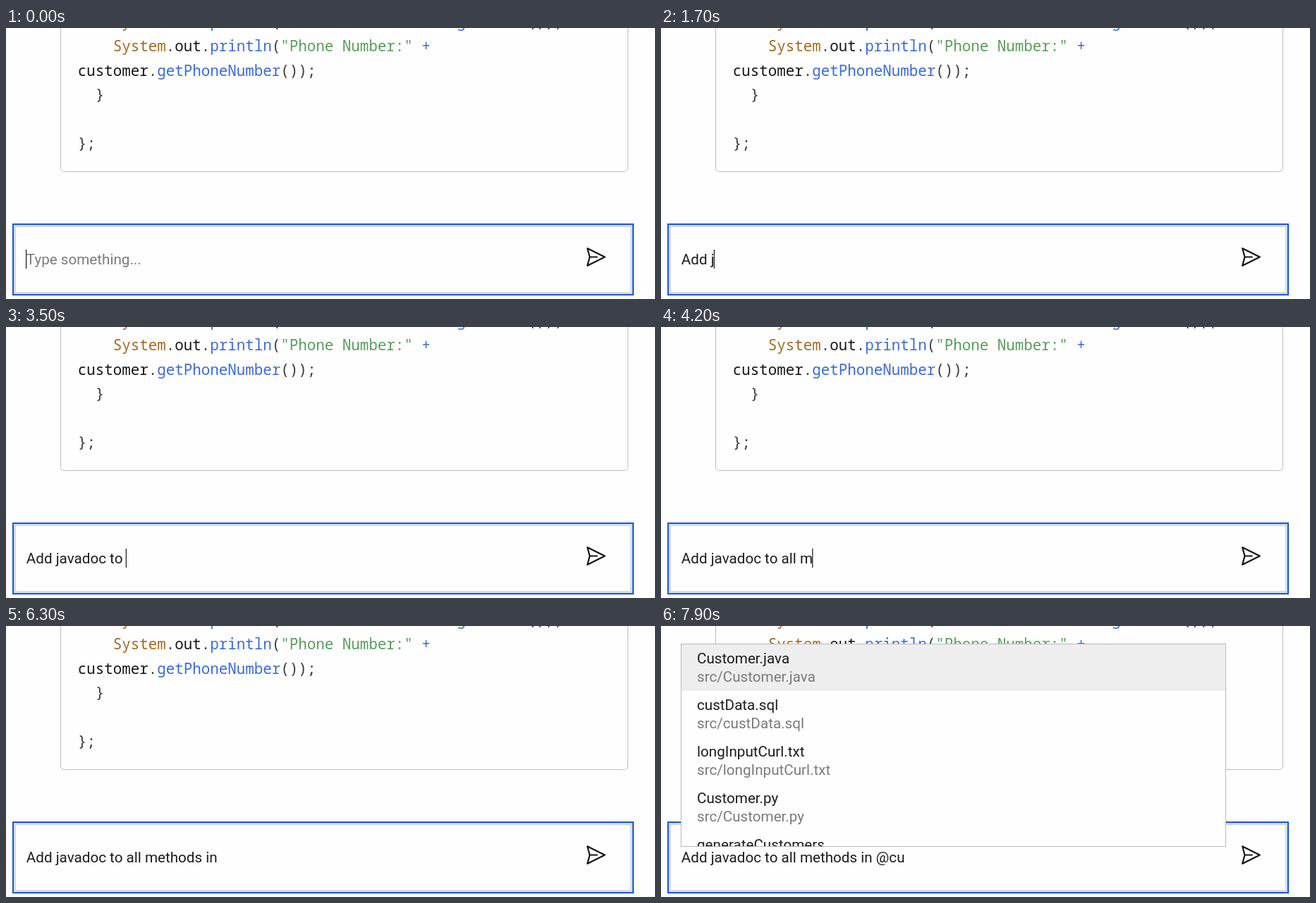
These frames come from a looping animation (920x384 px, 8 s). An HTML page:

```html
<!DOCTYPE html>
<html lang="en">
<head>
<meta charset="utf-8">
<title>Chat input</title>
<style>
  html, body { margin: 0; width: 100%; height: 100%; overflow: hidden; background: #fefefe; }
  svg { display: block; }
  text { white-space: pre; font: 20.65px Roboto, sans-serif; fill: #1c1c1c; }
  .code text { font: 20.83px "Noto Sans Mono", monospace; fill: #393939; }
  .code .type { fill: #a8681c; }
  .code .name { fill: #161616; }
  .code .call { fill: #3a6bd6; }
  .code .str { fill: #569e58; }
  text.dim { fill: #7a7a7a; }
</style>
</head>
<body>
<svg width="920" height="384" viewBox="0 0 920 384">
  <defs>
    <clipPath id="menuClip"><rect x="29" y="26" width="771" height="286"/></clipPath>
  </defs>
  <rect width="920" height="384" fill="#fefefe"/>
  <rect x="77.5" y="-40" width="804" height="243.5" rx="5" fill="none" stroke="#bdbdbd"/>
  <g class="code" id="code"></g>

  <rect x="10" y="278" width="879" height="100" fill="#fefefe" stroke="#1d58cf" stroke-width="2"/>
  <rect x="11.75" y="279.75" width="875.5" height="96.5" fill="none" stroke="#c3d6f5" stroke-width="1.5"/>
  <rect x="13.25" y="281.25" width="872.5" height="93.5" fill="none" stroke="#d3d5da" stroke-width="1.5"/>
  <path d="M824.2 312.2 L848.8 324.5 L824.2 336.8 L827.5 324.5 Z M827.5 324.5 H838.7"
    fill="none" stroke="#161616" stroke-width="2.2" stroke-linejoin="round"/>

  <g id="menu">
    <rect x="28.5" y="25.5" width="772" height="287" fill="#fefefe" stroke="#b9b9b9"/>
    <rect x="29" y="26" width="771" height="66" fill="#eee"/>
    <g id="rows" clip-path="url(#menuClip)"></g>
  </g>
  <text id="hint" class="dim" x="28.8" y="335">Type something...</text>
  <text id="typed" x="28.8" y="335"></text>
  <rect id="caret" y="314" width="1.2" height="27" fill="#161616"/>
</svg>
<script>
const LOOP = 8000, STEP = 100, BLINK = 500;
const $ = id => document.getElementById(id);
const MESSAGE = "Add javadoc to all methods in @cu";

// Typing runs: [number of characters, first key time, gap between keys]
const RUNS = [[4, 1000, 150], [7, 1600, 200], [19, 2950, 150], [1, 6400, 0], [1, 6800, 0], [1, 7300, 0]];
const keys = RUNS.flatMap(([n, at, gap]) => Array.from({ length: n }, (_, i) => at + i * gap));
const MENU_AT = 6500, NARROW_AT = 7300;

const WIDE = ["Customer.java", "testLoadTablesChildConnectionReceiverJob.h", "custData.sql",
  "LoadTablesChildConnectionReceiverJob.cpp", "refPCpp2.json"];
const NARROW = ["Customer.java", "custData.sql", "longInputCurl.txt", "Customer.py", "generateCustomers"];

function addText(parent, x, y, str, cls) {
  const el = document.createElementNS("http://www.w3.org/2000/svg", "text");
  el.setAttribute("x", x);
  el.setAttribute("y", y);
  if (cls) el.setAttribute("class", cls);
  el.textContent = str;
  parent.append(el);
}

// Each line is a list of [class, text] on a fixed character grid
function codeLine(row, col, parts) {
  for (const [cls, str] of parts) {
    addText($("code"), 101.8 + col * 12.5, -1.5 + row * 34.5, str, cls);
    col += str.length;
  }
}
const print = label => [["type", "System"], ["", "."], ["name", "out"], ["", "."],
  ["call", "println"], ["", "("], ["str", label], ["call", " +"]];
codeLine(0, 4, [...print('"Email:"'), ["name", " customer"], ["", "."], ["call", "getEmail"], ["", "());"]]);
codeLine(1, 4, print('"Phone Number:"'));
codeLine(2, 0, [["name", "customer"], ["", "."], ["call", "getPhoneNumber"], ["", "());"]]);
codeLine(3, 2, [["", "}"]]);
codeLine(5, 0, [["", "};"]]);

let shown = null;
function showFiles(files) {
  if (files === shown) return;
  shown = files;
  $("rows").replaceChildren();
  files.forEach((file, i) => {
    addText($("rows"), 51, 53 + i * 66, file);
    addText($("rows"), 51, 79 + i * 66, "src/" + file, "dim");
  });
}

function draw(ms) {
  const t = Math.floor((ms % LOOP) / STEP) * STEP;
  const count = keys.filter(k => k <= t).length;
  const typed = $("typed");
  typed.textContent = MESSAGE.slice(0, count);
  $("hint").style.display = count ? "none" : "";

  const sinceKey = t - (count ? keys[count - 1] : 0);
  $("caret").style.display = sinceKey % (2 * BLINK) < BLINK ? "" : "none";
  $("caret").setAttribute("x", 28 + (count ? typed.getComputedTextLength() : 0));

  $("menu").style.display = t >= MENU_AT ? "" : "none";
  showFiles(t >= NARROW_AT ? NARROW : WIDE);
}

const start = performance.now();
function tick() {
  draw(performance.now() - start);
  requestAnimationFrame(tick);
}
tick();
</script>
</body>
</html>
```
